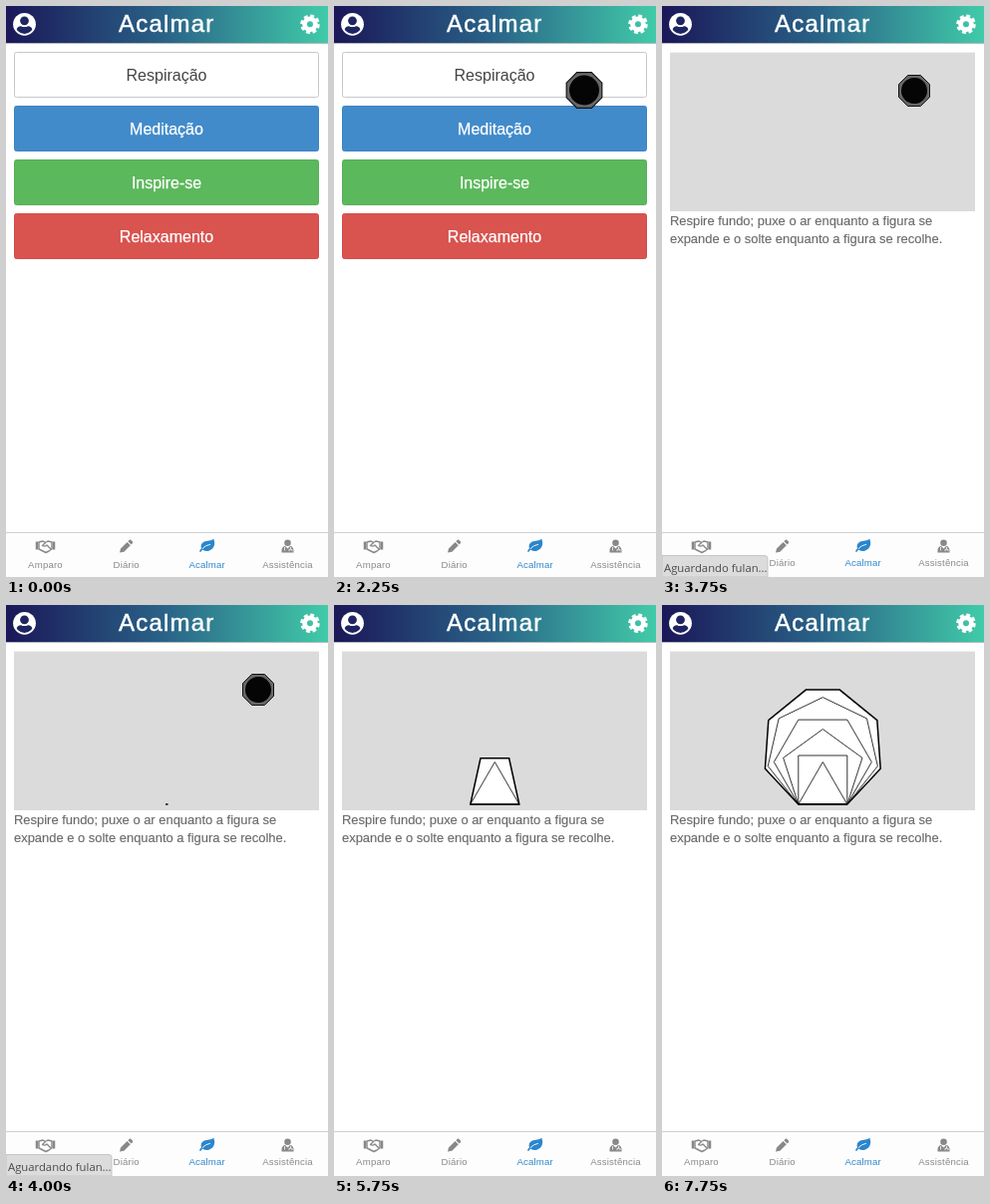
Animation of 323x573 px, one loop 8000 ms. Source, as an HTML page:

```html
<!DOCTYPE html>
<html lang="pt">
<head>
<meta charset="utf-8">
<title>Acalmar</title>
<style>
  html, body { margin: 0; width: 100%; height: 100%; overflow: hidden; background: #fff; }
  svg { display: block; width: 100vw; height: 100vh; }
  text { font-family: "Liberation Sans", Arial, sans-serif; }
  .mid { text-anchor: middle; }
  .title { font-size: 24px; letter-spacing: 1.2px; fill: #fff; stroke: #fff; stroke-width: .5px; }
  .button { font-size: 16px; fill: #fff; stroke: #fff; stroke-width: .25px; }
  .button .dark { fill: #444; stroke: none; }
  .help { font-size: 12.95px; fill: #6a6a6a; stroke: #6a6a6a; stroke-width: .15px; }
  .tab { font-size: 9.6px; letter-spacing: .2px; fill: #888; }
  .status { font: 11.3px "Open Sans", "Noto Sans", sans-serif; fill: #4a4a4a; }
  .active { fill: #2b86cc; }
  .hidden { display: none; }
</style>
</head>
<body>
<svg viewBox="0 0 323 573" preserveAspectRatio="none">
  <defs>
    <linearGradient id="bar">
      <stop offset="0" stop-color="#1b1758"/>
      <stop offset=".5" stop-color="#2a6488"/>
      <stop offset="1" stop-color="#41cba9"/>
    </linearGradient>
    <clipPath id="disc"><circle cx="18.5" cy="18.3" r="9.6"/></clipPath>
  </defs>

  <rect width="323" height="573" fill="#fff"/>
  <rect width="323" height="37" fill="url(#bar)"/>
  <rect y="37" width="323" height="1" fill="#b2b8bc"/>
  <text class="title mid" x="161.2" y="26">Acalmar</text>

  <g id="account">
    <circle cx="18.5" cy="18.3" r="11.4" fill="#fff"/>
    <g clip-path="url(#disc)" fill="#1e2560">
      <circle cx="18.5" cy="14.8" r="4.4"/>
      <path d="M10 29V25Q11 20.4 15 20.2Q18.5 22 22 20.2Q26 20.4 27 25V29Z"/>
    </g>
  </g>
  <g id="gear" fill="none" stroke="#fff">
    <circle cx="305" cy="18.3" r="5.4" stroke-width="4.8"/>
    <circle cx="305" cy="18.3" r="8" stroke-width="3.6" stroke-dasharray="3.7 2.583"/>
  </g>

  <g id="menu">
    <rect id="first" x="8.5" y="46.5" width="305" height="45" rx="2" fill="#fff" stroke="#c8c8c8"/>
    <rect x="8.5" y="100.5" width="305" height="45" rx="2" fill="#428bca" stroke="#3c84c3"/>
    <rect x="8.5" y="154.5" width="305" height="45" rx="2" fill="#5cb85c" stroke="#55b255"/>
    <rect x="8.5" y="208.5" width="305" height="45" rx="2" fill="#d9534f" stroke="#d44c48"/>
    <g class="button mid">
      <text x="161" y="75" class="dark">Respiração</text>
      <text x="161" y="129">Meditação</text>
      <text x="161" y="183">Inspire-se</text>
      <text x="161" y="237">Relaxamento</text>
    </g>
  </g>

  <g id="breath">
    <rect x="8" y="46.6" width="306" height="159.4" fill="#dbdbdb"/>
    <g transform="translate(161.3 200)">
      <path id="shape" fill="#fff" stroke="#000" stroke-width="1.5"/>
      <path id="inner" fill="none" stroke="#000" stroke-width=".8"/>
    </g>
    <text class="help" x="8" y="220">Respire fundo; puxe o ar enquanto a figura se</text>
    <text class="help" x="8" y="238">expande e o solte enquanto a figura se recolhe.</text>
  </g>

  <g id="tabs">
    <rect y="528" width="323" height="45" fill="#fdfdfd"/>
    <rect y="528" width="323" height="1" fill="#cfcfcf"/>
    <g fill="none" stroke="#888" stroke-width="1.4" stroke-linejoin="round">
      <path d="M33 538L37 537L39.500 538.500L42 537L46 538V545L43 547L40 548.500L36 546.500L33 545Z"/>
      <path d="M39.500 538.500L36.500 541.500Q38.500 543 41 541L45 545"/>
      <path d="M31 537.500V545.500M48 537.500V545.500" stroke-width="2.5"/>
    </g>
    <path d="M114 548.500L115 544.500L121.500 538L124.800 541.300L118.300 547.800ZM122.300 537.200L123.800 535.700Q124.500 535.200 125.200 535.800L127 537.600Q127.500 538.300 127 539L125.600 540.500Z" fill="#888"/>
    <path class="active" d="M194 547.500Q194.500 545 196 544.500Q194.500 540 198.500 537.700C202 536.300 206 537.300 208 534.500C210.500 539 209 545 203.500 546.700Q200 547.500 197.500 545.700Q196 546.300 195.300 548Z"/>
    <path d="M196.800 544.800Q200 541 205 540.300" fill="none" stroke="#fdfdfd" stroke-width=".9"/>
    <g fill="#888">
      <circle cx="282.5" cy="538.8" r="3.3"/>
      <path d="M276.500 548.500V546Q277 542.300 280 542L282.500 544.500L285 542Q288 542.300 288.500 546V548.500Z"/>
    </g>
    <path d="M279.500 543V546.500M285.500 543V545M284 547.200V545.300H287V547.200" fill="none" stroke="#fdfdfd" stroke-width=".8"/>
    <g id="labels" class="tab mid">
      <text x="39.5" y="564">Amparo</text>
      <text x="120.7" y="564">Diário</text>
      <text x="201.7" y="564" class="active">Acalmar</text>
      <text x="282.5" y="564">Assistência</text>
    </g>
  </g>

  <g id="status">
    <path d="M0 551.500H103Q106 551.500 106 554.500V573H0Z" fill="#dcdcdc" stroke="#c6c6c6"/>
    <text class="status" x="2" y="568">Aguardando fulan...</text>
  </g>

  <g id="cursor">
    <path d="M-6.4 -15.5H6.4L15.5 -6.4V6.4L6.4 15.5H-6.4L-15.5 6.4V-6.4Z" fill="#686868" stroke="#111"/>
    <circle r="13" fill="#050505"/>
  </g>
</svg>

<script>
const LOOP = 8000, STEP = 250, SIDE = 49;
const $ = id => document.getElementById(id);
const show = (id, on) => $(id).classList.toggle('hidden', !on);

// time, x, y, scale; a bare time hides the pointer
const pointer = [
  [0], [750, 321, 126, 1.15], [1000], [1500, 340, 76, 1.15], [1750, 339, 76, 1.15],
  [2000, 291.5, 76, 1.15], [2250, 251, 84.5, 1.15], [3000, 253, 85, 1],
  [4750, 306, 70.5, 1.15], [5000]
];

// Right half of a regular polygon standing on its base, from base to top
function half(k) {
  if (k === 1) return [[1, 0]];
  const pts = [[SIDE / 2, 0]];
  for (let i = 1; i < Math.floor((k + 1) / 2); i++) {
    const a = i * 2 * Math.PI / k, [x, y] = pts[i - 1];
    pts.push([x + SIDE * Math.cos(a), y - SIDE * Math.sin(a)]);
  }
  return pts;
}

// Polygon with a fractional number of sides
function polygon(n) {
  const k = Math.floor(n), f = n - k;
  const from = half(k), to = f ? half(k + 1) : from;
  if (to.length > from.length) from.push([0, from[from.length - 1][1]]);
  const right = to.map(([x, y], i) => [
    from[i][0] + (x - from[i][0]) * f,
    from[i][1] + (y - from[i][1]) * f
  ]);
  const left = right.map(([x, y]) => [-x, y]).reverse();
  const all = right.concat(left).map(p => p.map(v => v.toFixed(2)).join(' '));
  return 'M' + all.join('L') + 'Z';
}

function drawBreath(t) {
  const on = t >= 4000;
  show('shape', on);
  show('inner', on);
  if (!on) return;
  const n = 1 + 3.5 * (1 - Math.cos(Math.PI * (t - 3900) / 4450));
  let inner = '';
  for (let k = 3; k <= n; k++) inner += polygon(k);
  $('shape').setAttribute('d', polygon(n));
  $('inner').setAttribute('d', inner);
}

function draw(t) {
  const opened = t >= 3750;
  show('menu', !opened);
  show('breath', opened);
  show('status', t >= 3000 && t < 4500);
  $('first').setAttribute('stroke', t >= 3000 ? '#e3b662' : '#c8c8c8');
  $('labels').setAttribute('transform', `translate(0 ${opened ? -2 : 0})`);
  drawBreath(t);

  const [, x, y, s] = pointer.filter(p => p[0] <= t).pop();
  show('cursor', x !== undefined);
  if (x !== undefined) $('cursor').setAttribute('transform', `translate(${x} ${y}) scale(${s})`);
}

const start = performance.now();
function tick() {
  const t = (performance.now() - start) % LOOP;
  draw(Math.floor(t / STEP) * STEP);
  requestAnimationFrame(tick);
}
tick();
</script>
</body>
</html>
```
